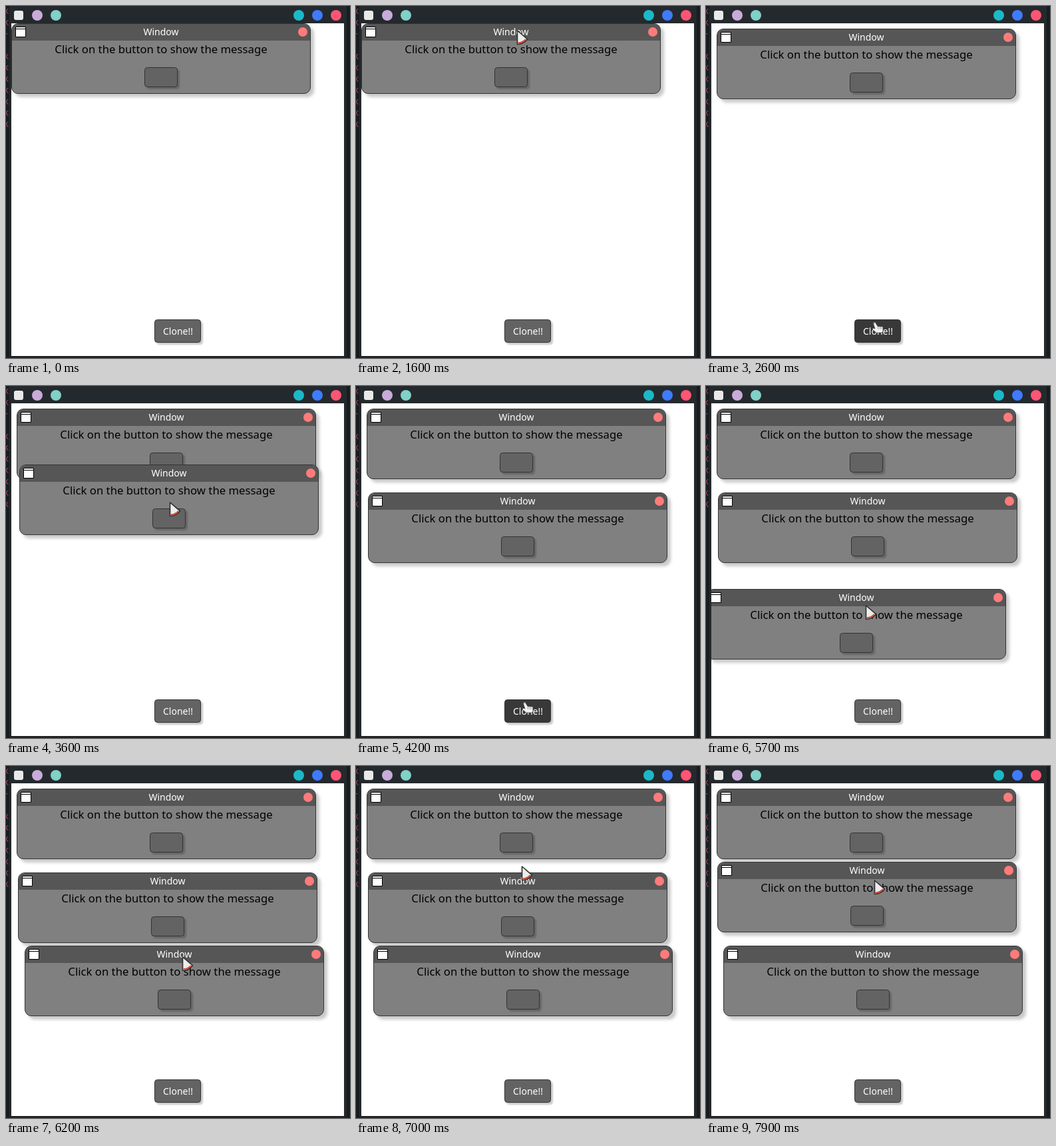
An HTML page that plays this animation: 517 px wide and 529 px high, repeating every 8000 ms.

```html
<!DOCTYPE html>
<html lang="en">
<head>
<meta charset="utf-8">
<title>Clone windows</title>
<style>
  html, body { margin: 0; width: 100%; height: 100%; overflow: hidden; background: #181d20; }
  svg { display: block; }
  text { font-family: "Noto Sans", "Open Sans", sans-serif; font-size: 14px; text-anchor: middle; fill: #fff; }
  .msg { font-size: 16.73px; fill: #000; }
  .term text { font-family: "Noto Sans Mono", "DejaVu Sans Mono", monospace; fill: #a03a55; text-anchor: end; }
  .win { filter: drop-shadow(5px 5px 2px rgba(0, 0, 0, .21)); }
  .btn { fill: #636363; stroke: #333; filter: drop-shadow(3px 3px 1px rgba(0, 0, 0, .21)); }
  .btn.hover { fill: #383838; }
</style>
</head>
<body>
<svg width="517" height="529" viewBox="0 0 517 529">
  <defs>
    <clipPath id="area"><rect x="8" y="26" width="500" height="500"/></clipPath>
    <g id="face">
      <rect x=".5" y=".5" width="449" height="105" rx="9.5" fill="#808080" stroke="#333"/>
      <path d="M1 26V10a9 9 0 0 1 9-9H440a9 9 0 0 1 9 9V26z" fill="#565656"/>
      <path d="M6.500 5.500h15v15h-15zM6.500 8.500h15" fill="#fff" stroke="#000"/>
      <circle cx="438" cy="13" r="7" fill="#ff7b7b"/>
    </g>
  </defs>
  <rect width="517" height="529" fill="#181d20"/>
  <g class="term" id="term"></g>
  <rect x="5" width="507" height="529" fill="#24292d"/>
  <rect y="526" x="5" width="507" height="3" fill="#1e2326"/>
  <rect x="12" y="7" width="14" height="14" rx="3" fill="#e9e9e9"/>
  <g fill="#c9abda">
    <circle cx="47" cy="14" r="8"/>
    <circle cx="75" cy="14" r="8" fill="#80d1c8"/>
    <circle cx="440" cy="14" r="8" fill="#1bb9c8"/>
    <circle cx="468" cy="14" r="8" fill="#3f7bff"/>
    <circle cx="496" cy="14" r="8" fill="#ff5575"/>
  </g>
  <g clip-path="url(#area)">
    <rect x="8" y="26" width="500" height="500" fill="#fff"/>
    <rect id="clone" class="btn" x="223.5" y="471.5" width="69" height="34" rx="4"/>
    <text x="258.500" y="494">Clone!!</text>
    <g id="wins"></g>
  </g>
  <g id="arrow">
    <path d="M.5 0V20.500Q9.500 20.500 15.500 12.800Z" fill="#ececec" stroke="#303030" stroke-width="1.600" stroke-linejoin="round"/>
    <path d="M1.500 18.300Q8.500 18.300 13 13" fill="none" stroke="#dc4a33" stroke-width="2"/>
  </g>
  <g id="hand">
    <path d="M1 1L4 0L8 6.500L16 7V14L14 16H6L0 11L1 9L4 10Z" fill="#f2f2f2" stroke="#333" stroke-width=".6"/>
    <path d="M8.500 7v4M11.500 7v4M14 7.500v3" stroke="#777" stroke-width=".7"/>
    <rect x="1" y="1" width="2" height="2" fill="#e0503a"/>
  </g>
</svg>
<script>
const $ = id => document.getElementById(id);

$('term').innerHTML = [...'kk- kkkkkkk']
  .map((c, i) => `<text x="4.500" y="${12 + 17 * i}">${c}</text>`).join('');

$('wins').innerHTML = `<g class="win">
  <use href="#face"/>
  <text x="225" y="18">Window</text>
  <text class="msg" x="225" y="45">Click on the button to show the message</text>
  <rect class="btn" x="200.5" y="66.5" width="49" height="29" rx="4"/>
</g>`.repeat(3);

const linear = f => f;
const smooth = f => f * f * (3 - 2 * f);
const easeOut = f => 1 - (1 - f) ** 2;

// Times are in ticks of 100 ms.
const moves = [];
const move = (from, to, x, y, ease = smooth, bow = 0) => moves.push({ from, to, x, y, ease, bow });
const toClone = (from, to) => move(from, to, 250, 475);

const entry = { tick: 6, x: 431, y: 92 };
move(6, 9, 239, 34, easeOut);
move(15, 18, 247, 42, linear);          // nudge the first window
toClone(18, 25);
move(28, 33, 244, 49);
move(33, 36, 246, 175, linear, 3);      // drag the second window down
toClone(37, 42);
move(45, 51, 255, 51, smooth, 16);
move(51, 57, 240, 330, easeOut);        // drag the third window down
move(57, 61, 267, 287, linear);
move(61, 62, 265, 287);
move(63, 68, 254, 168);
move(69, 70, 249, 151);                 // drag the second window up
move(72, 76, 253, 152);
move(78, 79, 253, 172);

function cursorAt(tick) {
  let { x, y } = entry;
  for (const m of moves) {
    if (tick <= m.from) break;
    const f = Math.min(1, (tick - m.from) / (m.to - m.from));
    const k = m.ease(f);
    x += (m.x - x) * k + m.bow * Math.sin(Math.PI * k);
    y += (m.y - y) * k;
  }
  return [Math.round(x), Math.round(y)];
}

const wins = [
  { home: [8, 26], born: 0, drags: [[15, 18]] },
  { home: [16, 34], born: 27, drags: [[33, 36], [69, 76]] },
  { home: [16, 34], born: 44, drags: [[51, 62]] }
];

// A held window follows the cursor one tick late.
function windowAt({ home, born, drags }, tick) {
  if (tick < born) return null;
  return drags.reduce((pos, [from, to]) => {
    const grab = cursorAt(from);
    const now = cursorAt(Math.max(from, Math.min(to, tick - 1)));
    return pos.map((p, i) => p + now[i] - grab[i]);
  }, home);
}

function place(el, pos) {
  el.style.display = pos ? '' : 'none';
  if (pos) el.setAttribute('transform', `translate(${pos})`);
}

const start = performance.now();
function draw() {
  const tick = Math.floor((performance.now() - start) % 8000 / 100);
  wins.forEach((w, i) => place($('wins').children[i], windowAt(w, tick)));
  const pos = tick < entry.tick ? null : cursorAt(tick);
  const hover = !!pos && pos[1] >= 471;
  $('clone').classList.toggle('hover', hover);
  place($('arrow'), hover ? null : pos);
  place($('hand'), hover ? pos : null);
  requestAnimationFrame(draw);
}
draw();
</script>
</body>
</html>
```
